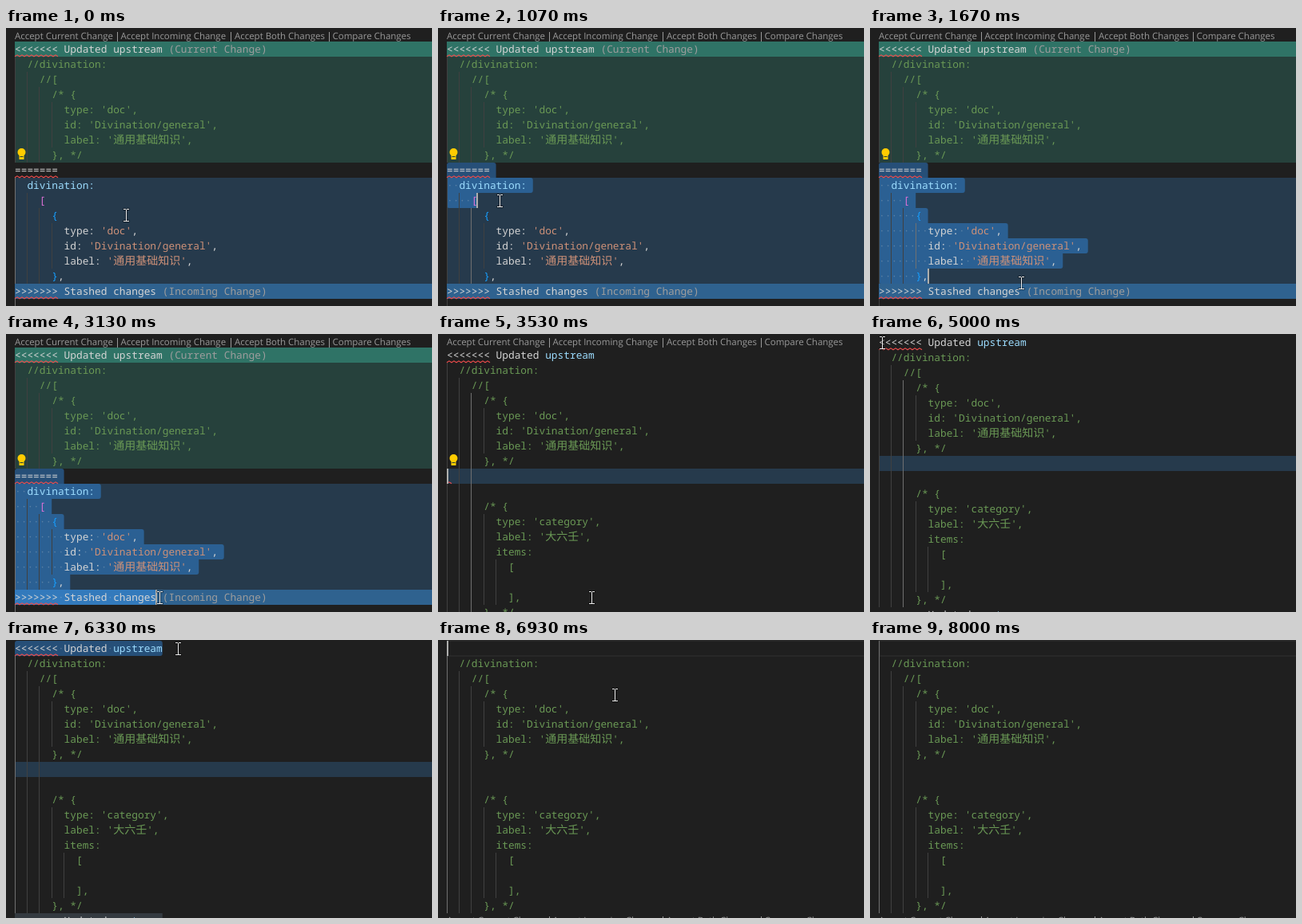
Write an HTML page with a canvas that moves like this. It is 533 px wide and 349 px high and loops after 8340 ms.

```html
<!DOCTYPE html>
<html lang="en">
<head>
<meta charset="utf-8">
<title>Resolving a merge conflict</title>
<style>
  html, body { margin: 0; width: 100%; height: 100%; overflow: hidden; background: #1f1f1f; }
  canvas { display: block; }
</style>
</head>
<body>
<canvas id="stage" width="533" height="349"></canvas>
<script>
const ctx = document.getElementById('stage').getContext('2d');
const LOOP = 8340, W = 533, H = 349, LEFT = 11, LINE = 19, CELL = 7.698, WIDE = 14;
const CODE = '12.83px "Noto Sans Mono", monospace';
const CJK = '14px "Noto Sans CJK SC", "Noto Sans CJK", "Noto Sans CJK JP", sans-serif';
const LENS = '11.47px "Open Sans", sans-serif';
const COMMENT = '#6a9955', KEY = '#9cdcfe', STRING = '#ce9178', PLAIN = '#d4d4d4';

// Moments at which the document changes
const PRESS = 800, CUT = 3530, REFLOW = 3870, PRESS2 = 5270, CUT2 = 6530, REPARSE = 6870;

const HEAD = '<<<<<<< Updated upstream';
const entry = ["        type: 'doc',", "        id: 'Divination/general',", "        label: '通用基础知识',"];
const commented = ['  //divination:', '    //[', '      /* {', ...entry, '      }, */'];
const before = [HEAD, ...commented, '=======', '  divination:', '    [', '      {', ...entry, '      },',
  '>>>>>>> Stashed changes', ''];
const after = [HEAD, ...commented, '', '', '      /* {', "        type: 'category',", "        label: '大六壬',",
  '        items:', '          [', '', '          ],', '      }, */', HEAD];

// Pointer path: time, x, y
const path = [
  [0, 150, 235], [70, 150, 235], [600, 14, 180], [800, 14, 180], [1070, 77, 217], [1330, 140, 268],
  [1600, 185, 314], [1900, 203, 338], [2200, 192, 331], [3560, 192, 331], [4330, 8, 34], [4530, 2, 14],
  [4670, 2, 14], [4730, 10, 16], [4870, 10, 16], [5000, 15, 11], [5270, 15, 11], [6000, 215, 11],
  [6840, 215, 11], [7400, 250, 370], [LOOP, 250, 370]
];

// Caret blinking: restart time, half period
const blinks = [[PRESS, 2000], [2200, 465], [CUT, 490], [PRESS2, 2000], [5840, 490], [CUT2, 490]];

const clamp = (v, lo, hi) => Math.min(hi, Math.max(lo, v));
const isWide = c => c >= '\u4e00' && c <= '\u9fff';
const xAt = (text, col) => [...text.slice(0, col)].reduce((x, c) => x + (isWide(c) ? WIDE : CELL), LEFT);
const indentOf = text => text.search(/\S/);

function rect(color, x, y, w, h) {
  ctx.fillStyle = color;
  ctx.fillRect(x, y, w, h);
}

function pointerAt(t) {
  const i = path.findIndex(p => p[0] > t);
  const [t0, x0, y0] = path[i - 1], [t1, x1, y1] = path[i];
  const k = (t - t0) / (t1 - t0);
  return { x: x0 + (x1 - x0) * k, y: y0 + (y1 - y0) * k };
}

function caretOn(t) {
  const last = blinks.filter(b => b[0] <= t).pop();
  return !!last && Math.floor((t - last[0]) / last[1]) % 2 === 0;
}

function write(text, x, y, color) {
  ctx.fillStyle = color;
  for (const run of text.split(/([\u4e00-\u9fff]+)/)) {
    if (!run) continue;
    const wide = isWide(run[0]);
    ctx.font = wide ? CJK : CODE;
    ctx.fillText(run, x, y);
    x += run.length * (wide ? WIDE : CELL);
  }
}

function tokenColor(token) {
  if (token[0] === "'") return STRING;
  if (/^\w+:$/.test(token)) return KEY;
  if (token === '[') return '#da70d6';
  if (token === '{' || token === '}') return '#179fff';
  return PLAIN;
}

function drawCode(text, y, isComment, isHead) {
  if (isComment) return write(text, LEFT, y, COMMENT);
  if (isHead) {
    write(text.slice(0, 16), LEFT, y, PLAIN);
    return write(text.slice(16), xAt(text, 16), y, KEY);
  }
  for (const m of text.matchAll(/'[^']*'|\w+:|[\[{}]|[^'\[{},]+|,/g)) {
    const lead = m[0].length - m[0].trimStart().length;
    const token = m[0].slice(lead);
    if (token) write(token, xAt(text, m.index + lead), y, tokenColor(token));
  }
}

function drawLens(y) {
  ctx.font = LENS;
  ctx.fillStyle = '#999';
  const parts = [['Accept Current Change', 11], ['Accept Incoming Change', 143.5],
    ['Accept Both Changes', 286], ['Compare Changes', 408.5]];
  parts.forEach(([label, x], i) => {
    ctx.fillText(label, x, y + 13);
    if (i) rect('#999', Math.round(x - 5), y + 4, 1, 12);
  });
}

function drawSquiggle(y, width) {
  ctx.beginPath();
  for (let x = 0; x <= width; x += 3) ctx.lineTo(LEFT + x, y + (x % 2 ? 16.8 : 18.8));
  ctx.strokeStyle = '#f14c4c';
  ctx.lineWidth = 1.1;
  ctx.stroke();
}

function drawBulb(x, y) {
  ctx.fillStyle = '#ffcc00';
  ctx.beginPath();
  ctx.arc(x, y, 5, 0, Math.PI * 2);
  ctx.fill();
  ctx.fillRect(x - 3, y + 3, 6, 6);
  rect('#26413c', x - 2, y + 5, 4, 1);
}

// The selected columns of each row, from the start of row `first` to the caret
function selectionSpans(lines, first, caret) {
  const spans = [];
  for (let row = first; row <= caret.row; row++) {
    const end = row < caret.row ? lines[row].length : caret.col;
    const right = xAt(lines[row], end) + (row < caret.row ? CELL : 0);
    spans.push({ row, end, right });
  }
  return spans;
}

function drawSelection(spans, rowY) {
  ctx.fillStyle = '#264f78';
  spans.forEach(({ row, right }, i) => {
    const sticksOut = other => (!other || other.right < right) ? 3 : 0;
    ctx.beginPath();
    ctx.roundRect(LEFT, rowY(row), Math.max(0, right - LEFT), LINE,
      [i ? 0 : 3, sticksOut(spans[i - 1]), sticksOut(spans[i + 1]), i === spans.length - 1 ? 3 : 0]);
    ctx.fill();
  });
}

function drawGuides(lines, rowY, conflict, caret) {
  const active = !conflict ? (caret.row ? 0 + 4 : 0) : ({ 8: 0, 9: 2, 10: 4, 16: 0 })[caret.row] ?? 6;
  lines.forEach((text, row) => {
    let depth = indentOf(text);
    if (depth < 0) depth = conflict || row === 0 ? 2 : row < 10 ? 6 : 10;
    for (let col = 0; col < depth; col += 2) {
      const lit = col === active && (!conflict || row > 8);
      rect(lit ? '#707070' : '#404040', Math.floor(LEFT + col * CELL), rowY(row), 1, LINE);
    }
  });
}

function drawPointer({ x, y }) {
  if (x < LEFT) {
    ctx.beginPath();
    for (const [dx, dy] of [[0, 0], [0, 16], [4, 12.5], [6.5, 18], [9, 17], [6.5, 11.5], [11.5, 11.5]])
      ctx.lineTo(x + dx, y + dy);
    ctx.closePath();
    ctx.fillStyle = '#fff';
    ctx.strokeStyle = '#000';
    ctx.lineWidth = 1;
    ctx.fill();
    ctx.stroke();
    return;
  }
  x = Math.round(x);
  y = Math.round(y);
  const beam = (color, grow) => {
    rect(color, x - grow, y - 7 - grow, 1 + 2 * grow, 15 + 2 * grow);
    for (const top of [y - 8, y + 7]) {
      rect(color, x - 3 - grow, top - grow, 3 + grow, 1 + 2 * grow);
      rect(color, x + 1, top - grow, 3 + grow, 1 + 2 * grow);
    }
  };
  ctx.globalAlpha = 0.35;
  beam('#000', 1);
  ctx.globalAlpha = 1;
  beam('#f0f0f0', 0);
}

function draw(t) {
  const conflict = t < CUT, cleared = t >= CUT2;
  const lines = conflict ? before : [...after];
  if (cleared) lines[0] = '';
  const top = t < REFLOW ? 17 : 1;
  const rowY = row => top + row * LINE;
  const pointer = pointerAt(t);

  let caret = { row: 8, col: 0 }, spans = [];
  if (conflict && t >= PRESS) {
    const row = clamp(Math.floor((pointer.y - top) / LINE), 8, 16);
    caret = { row, col: clamp(Math.round((pointer.x - LEFT) / CELL), 0, lines[row].length) };
    spans = selectionSpans(lines, 8, caret);
  } else if (t >= PRESS2) {
    caret = { row: 0, col: cleared ? 0 : clamp(Math.round((pointer.x - LEFT) / CELL), 0, HEAD.length) };
    if (!cleared) spans = selectionSpans(lines, 0, caret);
  }

  rect('#1f1f1f', 0, 0, W, H);
  if (cleared) {
    ctx.strokeStyle = '#282828';
    ctx.lineWidth = 2;
    ctx.strokeRect(LEFT + 1, rowY(0), W, LINE);
  }
  if (t >= PRESS2 && !cleared && caret.col === HEAD.length)
    rect('rgba(173,214,255,.15)', LEFT, rowY(18), xAt(HEAD, HEAD.length) - LEFT, LINE);
  drawSelection(spans, rowY);

  // Conflict tints lie over the selection
  const band = (color, row, count) => rect(color, LEFT, rowY(row), W - LEFT, count * LINE);
  if (conflict) {
    band('rgba(64,200,174,.5)', 0, 1);
    band('rgba(64,200,174,.2)', 1, 7);
    band('rgba(64,166,255,.2)', 9, 7);
    band('rgba(64,166,255,.5)', 16, 1);
  } else if (t < REPARSE) {
    band('rgba(64,166,255,.2)', 8, 1);
  }

  drawGuides(lines, rowY, conflict, caret);
  for (const { row, end } of spans)
    [...lines[row].slice(0, end)].forEach((c, col) => {
      if (c === ' ') write('·', xAt(lines[row], col), rowY(row) + 14, 'rgba(227,228,226,.25)');
    });

  const lensBelow = t >= REPARSE;
  lines.forEach((text, row) => {
    if (row === 18 && lensBelow) return;
    const isComment = row > 0 && row < (conflict ? 8 : 18);
    drawCode(text, rowY(row) + 14, isComment, !conflict && text === HEAD);
  });
  if (conflict) {
    write('(Current Change)', LEFT + 25 * CELL, rowY(0) + 14, '#9d9d9d');
    write('(Incoming Change)', LEFT + 24 * CELL, rowY(16) + 14, '#9d9d9d');
    for (const row of [8, 16]) drawSquiggle(rowY(row), 54);
  }
  if (!cleared) drawSquiggle(rowY(0), 54);
  if (t < REFLOW) {
    if (!conflict) drawSquiggle(rowY(8), 8);
    drawLens(1);
    drawBulb(19.5, 156);
  }
  if (lensBelow) drawLens(rowY(18));

  if (caretOn(t)) {
    const x = Math.max(LEFT, Math.round(xAt(lines[caret.row], caret.col)) - 1);
    rect('#aeafad', x, rowY(caret.row), 2, LINE);
  }
  drawPointer(pointer);
}

ctx.textRendering = 'geometricPrecision';
function tick() {
  draw(performance.now() % LOOP);
  requestAnimationFrame(tick);
}
tick();
</script>
</body>
</html>
```
